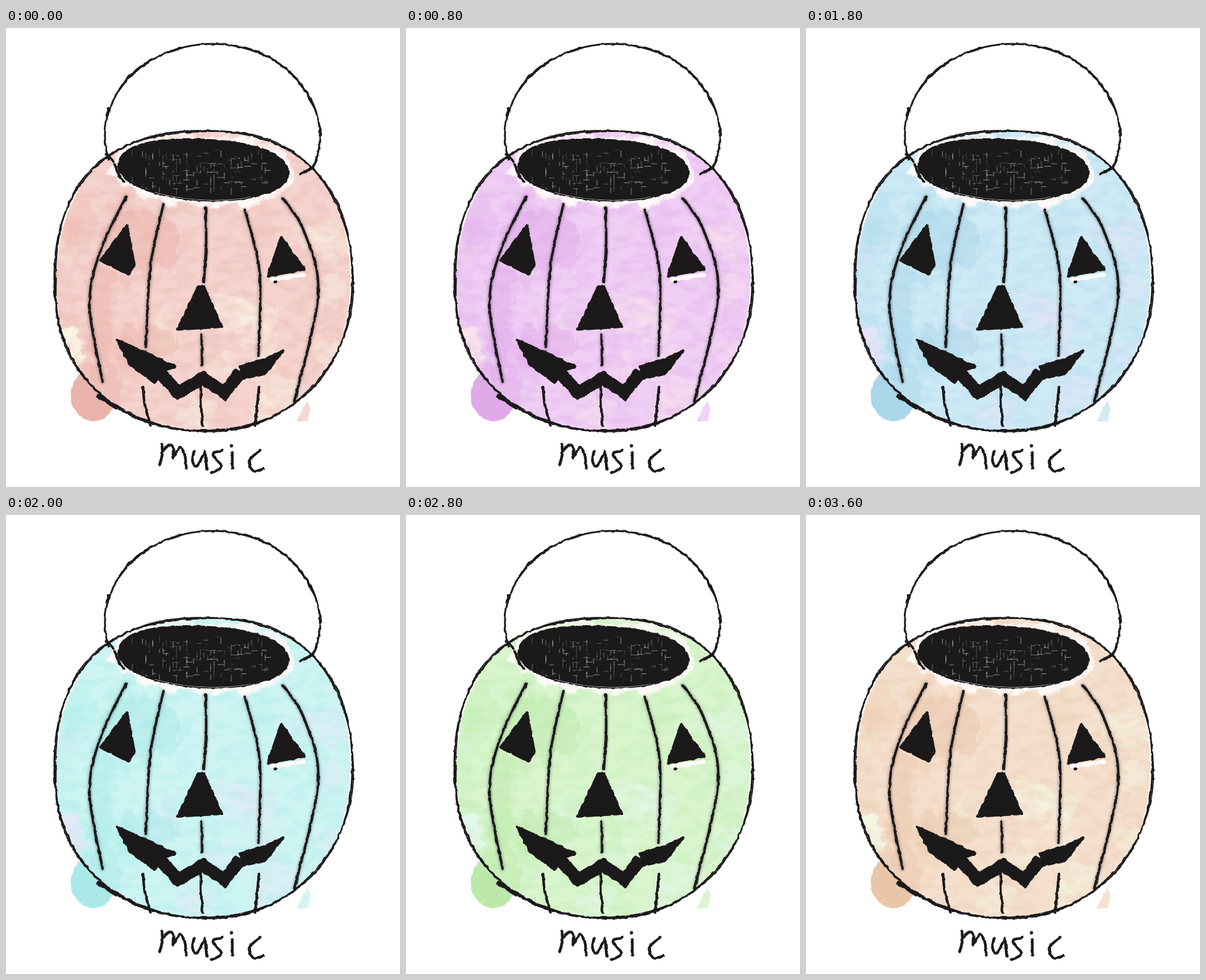
These frames come from a looping animation (693x808 px, 3.8 s). An HTML page:

```html
<!DOCTYPE html>
<html lang="en">
<head>
<meta charset="utf-8">
<title>music</title>
<style>
  html, body { margin: 0; width: 100%; height: 100%; overflow: hidden; background: #fff; }
  svg { display: block; width: 693px; height: 808px; }
  .wash { fill: hsl(var(--hue), 66%, 88.5%); }
  .deep { fill: hsl(var(--hue), 58%, 79%); }
  .pale { fill: hsl(calc(var(--hue) + 45), 58%, 93%); }
  .line, .gap, .scratch { fill: none; stroke-linecap: round; stroke-linejoin: round; }
  .line { stroke: #1b191a; }
  .gap { stroke: #fffaf8; }
  .scratch { stroke: #fff; }
  .solid { fill: #1b191a; stroke: #1b191a; stroke-width: 4; stroke-linejoin: round; }
</style>
</head>
<body>
<svg viewBox="0 0 693 808" role="img" aria-label="Pumpkin bucket, music">
  <defs>
    <filter id="rough" filterUnits="userSpaceOnUse" x="0" y="0" width="693" height="808" color-interpolation-filters="sRGB">
      <feTurbulence type="fractalNoise" baseFrequency=".1" numOctaves="2" seed="4"/>
      <feDisplacementMap in="SourceGraphic" scale="4" xChannelSelector="R" yChannelSelector="G"/>
    </filter>
    <filter id="bleed" filterUnits="userSpaceOnUse" x="0" y="0" width="693" height="808" color-interpolation-filters="sRGB">
      <feTurbulence type="fractalNoise" baseFrequency=".04" numOctaves="4" seed="9" result="noise"/>
      <feGaussianBlur in="SourceGraphic" stdDeviation="2"/>
      <feDisplacementMap in2="noise" scale="45" xChannelSelector="R" yChannelSelector="G"/>
    </filter>
    <filter id="grain" filterUnits="userSpaceOnUse" x="0" y="0" width="693" height="808" color-interpolation-filters="sRGB">
      <feTurbulence type="fractalNoise" baseFrequency=".03 .06" numOctaves="5" seed="21"/>
      <feColorMatrix values="0 0 0 0 0  0 0 0 0 0  0 0 0 0 0  4 0 0 0 -1.8" result="mask"/>
      <feComposite in="SourceGraphic" in2="mask" operator="in"/>
    </filter>
    <filter id="soft" x="-50%" y="-30%" width="200%" height="160%"><feGaussianBlur stdDeviation="2"/></filter>
    <clipPath id="inside"></clipPath>
    <clipPath id="hole"></clipPath>
  </defs>
  <g id="spills" filter="url(#rough)"></g>
  <g clip-path="url(#inside)">
    <g id="base"></g>
    <g id="patches" filter="url(#bleed)"></g>
    <g id="mottle" filter="url(#grain)" opacity=".3"></g>
    <g id="gaps" filter="url(#rough)"></g>
  </g>
  <g id="smudges" filter="url(#soft)" opacity=".3"></g>
  <g id="ink" filter="url(#rough)"></g>
  <g id="scratches" clip-path="url(#hole)"></g>
</svg>
<script>
const parse = text => text.split(' ').map(p => p.split(',').map(Number));
const polygon = text => 'M' + parse(text).join('L') + 'Z';

let seed = 17;
const random = () => (seed = seed * 16807 % 2147483647) / 2147483647;
const between = (a, b) => a + (b - a) * random();

// Smooth open curve through a few points
function curve(text) {
  const p = parse(text), last = p.length - 1;
  let d = 'M' + p[0];
  for (let i = 0; i < last; i++) {
    const a = p[Math.max(0, i - 1)], b = p[i], c = p[i + 1], e = p[Math.min(last, i + 2)];
    const lead = b.map((v, k) => v + (c[k] - a[k]) / 6);
    const tail = c.map((v, k) => v - (e[k] - b[k]) / 6);
    d += `C${lead} ${tail} ${c}`;
  }
  return d;
}

// Superellipse arc in degrees, with its own squareness above and below the middle
function oval(cx, cy, rx, ry, { from = 0, to = 360, top = 2, bottom = 2, tilt = 0, wobble = 0 } = {}) {
  const points = [], turn = tilt * Math.PI / 180;
  for (let deg = from; deg <= to; deg += 3) {
    const angle = deg * Math.PI / 180, c = Math.cos(angle), s = Math.sin(angle);
    const power = s < 0 ? top : bottom;
    const k = (Math.abs(c) ** power + Math.abs(s) ** power) ** (-1 / power)
      * (1 + wobble * Math.sin(5 * angle + 1) / rx);
    const x = rx * c * k, y = ry * s * k;
    points.push([cx + x * Math.cos(turn) - y * Math.sin(turn), cy + x * Math.sin(turn) + y * Math.cos(turn)]
      .map(v => v.toFixed(1)));
  }
  return 'M' + points.join('L') + (to - from === 360 ? 'Z' : '');
}
const body = options => oval(347, 445, 262, 264, { top: 2.32, bottom: 2.15, ...options });
const opening = options => oval(347, 250, 149, 53, { top: 2.3, tilt: 3, ...options });
const handle = options => oval(363, 190, 189, 162, options);

function add(layer, d, className, attributes = {}) {
  const el = document.createElementNS('http://www.w3.org/2000/svg', 'path');
  for (const [k, v] of Object.entries({ d, class: className, ...attributes })) el.setAttribute(k, v);
  document.getElementById(layer).append(el);
}
const pen = (d, width, layer = 'ink', className = 'line') => add(layer, d, className, { 'stroke-width': width });
const stroke = (points, width) => pen(curve(points), width);
const solid = points => add('ink', polygon(points), 'solid');

// Paint
add('inside', body(), '');
add('hole', opening(), '');
add('base', body(), 'wash');
add('mottle', body(), 'deep');
add('spills', oval(154, 646, 40, 46), 'deep');
add('spills', polygon('529,657 536,665 531,692 511,692'), 'deep', { opacity: .5 });

for (let i = 0; i < 44; i++) {
  const x = between(90, 600), y = between(300, 700);
  const tint = random() < (x < 310 ? .75 : .3) ? 'deep' : 'pale';
  add('patches', oval(x, y, between(14, 38), between(20, 55)), tint, { opacity: tint === 'deep' ? .16 : .4 });
}
for (const [x, y, rx, ry] of [[235, 375, 72, 55], [165, 510, 22, 105], [245, 555, 55, 32], [150, 640, 55, 45]]) {
  add('patches', oval(x, y, rx, ry), 'deep', { opacity: .5 });
}
add('patches', oval(115, 560, 18, 34), 'pale');
pen(opening(), 24, 'patches', 'gap');

pen(opening({ from: 10, to: 170 }), 11, 'gaps', 'gap');
pen(curve('468,443 524,434'), 7, 'gaps', 'gap');
pen(body({ from: 185, to: 215 }), 9, 'gaps', 'gap');
pen(body({ from: -20, to: 20 }), 8, 'gaps', 'gap');

// Handle
pen(handle({ from: 165, to: 375 }), 3.2);
pen(handle({ from: 205, to: 255, wobble: 2 }), 2.5);
pen(handle({ from: 282, to: 360, wobble: 2 }), 2.5);
stroke('180,142 178,154', 5.5);
stroke('177,222 189,235', 4.5);
stroke('546,232 538,246 517,257', 4.5);

// Body outline, gone over more than once
pen(body(), 3);
pen(body({ wobble: 2.5 }), 2);
pen(body({ from: 160, to: 182, wobble: 3 }), 3.5);
pen(body({ from: 60, to: 144 }), 4);
stroke('162,648 194,668', 7);

// Bucket opening
add('ink', opening(), 'solid');
stroke('191,240 200,262 208,271', 4.5);

// Ribs
const ribs = [
  '211,297 165,395 147,490 170,623',
  '277,310 254,420 246,562',
  '351,316 352,380 348,447',
  '420,320 446,430 444,577',
  '487,300 525,360 549,470 507,658',
  '344,540 345,593',
];
for (const rib of ribs) {
  stroke(rib, 4.4);
  pen(curve(rib), 7, 'smudges');
}
for (let i = 0; i < 3; i++) {
  const x = 241 + 102 * i;
  stroke(`${x},632 ${x + 3 - 3 * i},662 ${x + 13 - 10 * i},700`, 4.6);
}

// Face
solid('213,347 226,417 215,434 166,409');
solid('484,368 525,425 460,437');
solid('338,455 348,455 380,526 301,531');
stroke('473,447 474,447', 5);
solid('195,549 248,572 298,596 276,604 262,624 218,593');
solid('488,568 455,583 412,596 414,618 455,609');
add('ink', 'M266,602L303,642L346,616L384,642L412,606', 'line', { 'stroke-width': 22, style: 'stroke-linejoin: miter; stroke-linecap: butt' });

// Lettering
const letters = [
  '274,732 275,750 270,769', '274,748 286,734 295,740 294,757', '294,757 305,739 314,750 317,774',
  '331,745 328,762 336,771 350,746', '350,745 353,777',
  '381,743 364,751 379,772 361,783',
  '398,748 398,774', '396,735 397,735',
  '447,743 428,762 436,780 453,776',
];
for (const letter of letters) stroke(letter, 4.8);

// Thin pen gaps, hatched across the opening
for (let i = 0; i < 150; i++) {
  const upright = random() < .6, length = between(3, 12);
  const x = 222 + 6 * Math.floor(between(0, 40)), y = between(212, 284);
  add('scratches', `M${x},${y}` + (upright ? `v${length}` : `h${length}`), 'scratch', { opacity: between(.15, .6) });
}
pen(opening({ from: 55, to: 125 }).replace('250', '249'), 1.2, 'scratches', 'scratch');

// One turn of the colour wheel in held steps
const STEP = 200, STEPS = 19;
function tick() {
  const step = Math.floor(performance.now() / STEP) % STEPS;
  document.documentElement.style.setProperty('--hue', (8 - step * 360 / STEPS).toFixed(1));
  requestAnimationFrame(tick);
}
tick();
</script>
</body>
</html>
```
